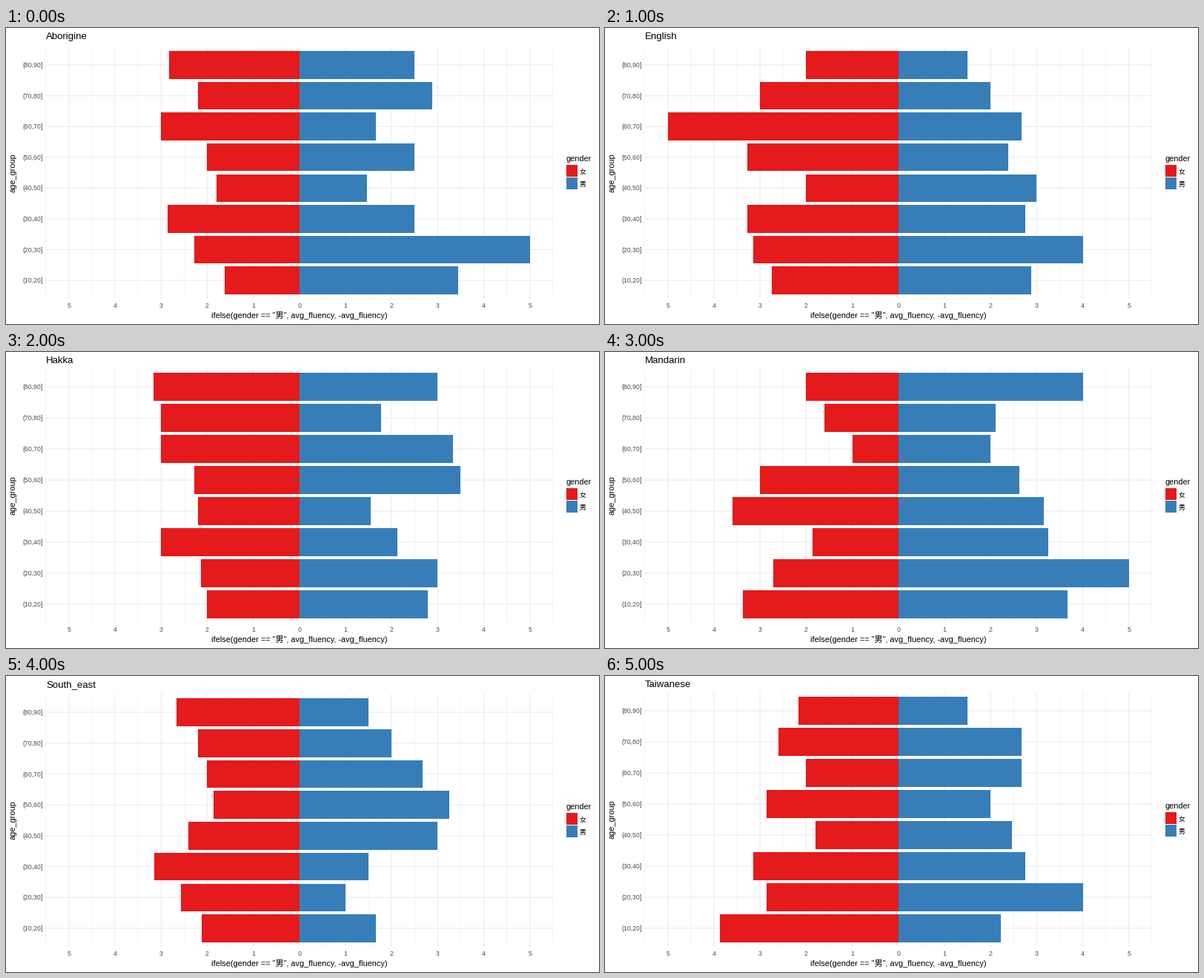
Recreate the animation shown at these times as a matplotlib script. Size 800x400 px, loop 6 s.

```python
import matplotlib.pyplot as plt
from matplotlib.animation import FuncAnimation
from matplotlib.patches import Rectangle

W, H, DPI = 800, 400, 100
PT = 72 / DPI                      # points per pixel
RED, BLUE, GRID = "#E41A1C", "#377EB8", "#EBEBEB"
MID, UNIT = 395.7, 62.2            # zero line and pixels per unit
LEFT, RIGHT, BOTTOM = MID - 5.5 * UNIT, MID + 5.5 * UNIT, 366
ROWS = 8

plt.rcParams["font.family"] = ["Liberation Sans", "Noto Sans CJK JP"]

# title, panel top, female means, male means (oldest group first)
PAGES = [
    ("Aborigine", 25,
     [2.83, 2.2, 3, 2, 1.8, 2.86, 2.28, 1.62],
     [2.5, 2.88, 1.66, 2.5, 1.47, 2.5, 5, 3.45]),
    ("English", 25,
     [2, 3, 5, 3.28, 2, 3.28, 3.14, 2.75],
     [1.5, 2, 2.67, 2.385, 3, 2.75, 4, 2.88]),
    ("Hakka", 22,
     [3.17, 3, 3, 2.28, 2.2, 3, 2.13, 2],
     [3, 1.775, 3.33, 3.5, 1.55, 2.125, 3, 2.79]),
    ("Mandarin", 22,
     [2, 1.6, 1, 3, 3.6, 1.86, 2.71, 3.375],
     [4, 2.11, 2, 2.625, 3.16, 3.25, 5, 3.67]),
    ("South_east", 24,
     [2.67, 2.2, 2, 1.86, 2.4, 3.14, 2.57, 2.12],
     [1.5, 2, 2.67, 3.25, 3, 1.5, 1, 1.66]),
    ("Taiwanese", 22,
     [2.17, 2.6, 2, 2.86, 1.8, 3.14, 2.86, 3.87],
     [1.5, 2.67, 2.67, 2, 2.46, 2.75, 4, 2.22]),
]

fig = plt.figure(figsize=(W / DPI, H / DPI), dpi=DPI, facecolor="white")
ax = fig.add_axes([0, 0, 1, 1])


def line(x0, y0, x1, y1, width):
    ax.plot([x0, x1], [y0, y1], color=GRID, lw=width * PT,
            solid_capstyle="butt", snap=False, zorder=1)


def box(x0, y0, x1, y1, color):
    """Filled rectangle on whole pixels."""
    x0, y0, x1, y1 = (int(v + 0.5) for v in (x0, y0, x1, y1))
    ax.add_patch(Rectangle((x0, y0), x1 - x0, y1 - y0, fc=color, lw=0,
                           antialiased=False, zorder=2))


def label(x, y, text, size, color="black", ha="left", **kw):
    ax.text(x, y, text, fontsize=size * PT, color=color, ha=ha,
            va="baseline", zorder=3, **kw)


def draw_grid(top, centers):
    for k in range(-11, 12):
        x = MID + k * UNIT / 2
        line(x, top, x, BOTTOM, 0.53 if k % 2 else 1.07)
    for y in centers:
        line(LEFT, y, RIGHT, y, 1.07)


def draw_axes(centers):
    for k in range(-5, 6):
        label(MID + k * UNIT, 378, str(abs(k)), 8.8, "#4D4D4D", "center")
    for i, y in enumerate(centers):
        low = 80 - 10 * i
        label(49.5, y + 3.2, f"({low},{low + 10}]", 8.8, "#4D4D4D", "right")
    label(MID, 392, 'ifelse(gender == "男", avg_fluency, -avg_fluency)',
          11, ha="center")


def draw_legend(mid):
    label(755, mid - 15.3, "gender", 11)
    top = int(mid - 9.7)
    for text, color in (("女", RED), ("男", BLUE)):
        box(756, top, 771, top + 16, color)
        label(774, top + 12, text, 8.8)
        top += 17


def draw(i):
    ax.clear()
    ax.set(xlim=(0, W), ylim=(H, 0))
    ax.axis("off")
    title, top, women, men = PAGES[i % len(PAGES)]
    step = (BOTTOM - top) / (ROWS + 0.2)
    centers = [top + step * (0.6 + k) for k in range(ROWS)]
    mid = (top + BOTTOM) / 2

    draw_grid(top, centers)
    for y, f, m in zip(centers, women, men):
        y0, y1 = y - 0.45 * step, y + 0.45 * step
        box(MID - f * UNIT, y0, MID, y1, RED)
        box(MID, y0, MID + m * UNIT, y1, BLUE)
    draw_axes(centers)
    draw_legend(mid)
    label(54, 15, title, 13.2)
    label(13, mid, "age_group", 11, ha="center", rotation=90,
          rotation_mode="anchor")
    return []


anim = FuncAnimation(fig, draw, frames=len(PAGES), interval=1000,
                     init_func=lambda: draw(0), repeat=True, repeat_delay=0)
plt.show()
```
